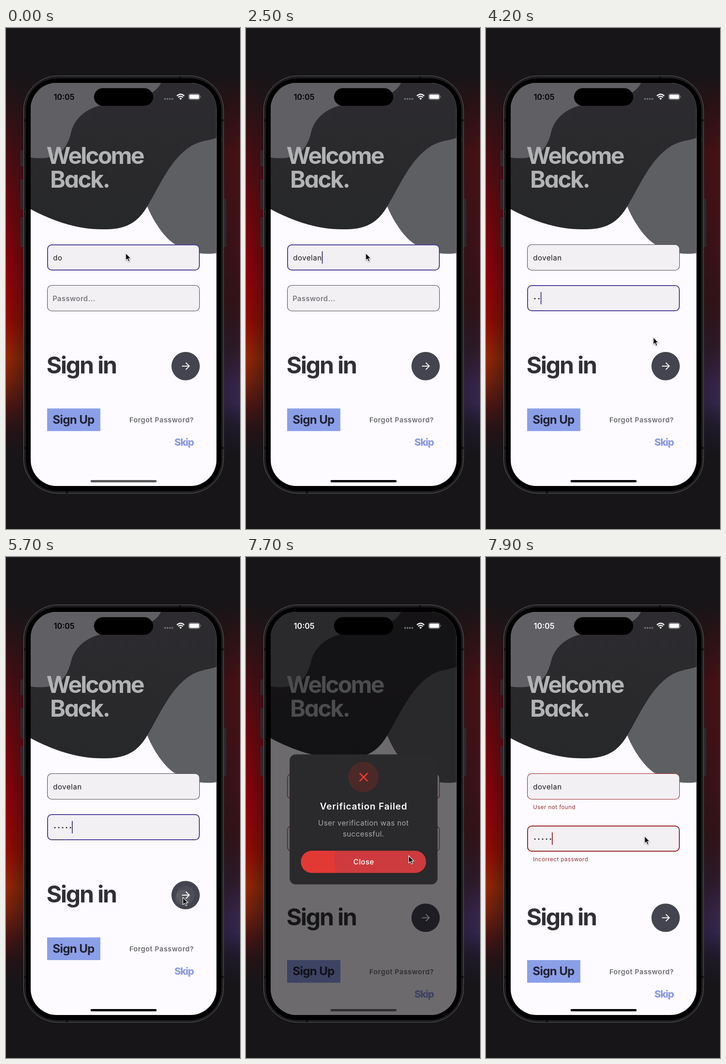
Write an HTML page that moves like this. It is 512x1095 px and loops after 8000 ms.

```html
<!DOCTYPE html>
<html lang="en">
<head>
<meta charset="utf-8">
<title>Sign in</title>
<style>
  html, body { margin: 0; width: 100%; height: 100%; overflow: hidden; background: #171518; }
  svg { display: block; width: 512px; height: 1095px; }
  text { font-family: Inter, "Open Sans", sans-serif; font-optical-sizing: none; white-space: pre; }
  .title { font-size: 51px; font-weight: 700; letter-spacing: -2.3px; font-feature-settings: "cv11"; }
  .body { font-size: 16px; letter-spacing: .4px; }
  .error { font-size: 12px; letter-spacing: .6px; fill: #9b2a2b; }
  .mid { text-anchor: middle; }
</style>
</head>
<body>
<svg viewBox="0 0 512 1095">
  <defs>
    <linearGradient id="leftGlow" gradientUnits="userSpaceOnUse" x1="0" y1="0" x2="0" y2="1000">
      <stop offset=".1" stop-color="#171518"/>
      <stop offset=".18" stop-color="#2c1115"/>
      <stop offset=".27" stop-color="#490c12"/>
      <stop offset=".4" stop-color="#70050c"/>
      <stop offset=".54" stop-color="#920008"/>
      <stop offset=".64" stop-color="#960a00"/>
      <stop offset=".72" stop-color="#982604"/>
      <stop offset=".77" stop-color="#7a210a"/>
      <stop offset=".83" stop-color="#4a1412"/>
      <stop offset=".88" stop-color="#271216"/>
      <stop offset=".93" stop-color="#171518"/>
    </linearGradient>
    <linearGradient id="rightGlow" gradientUnits="userSpaceOnUse" x1="0" y1="0" x2="0" y2="1000">
      <stop offset=".1" stop-color="#171518"/>
      <stop offset=".17" stop-color="#2c1115"/>
      <stop offset=".27" stop-color="#481014"/>
      <stop offset=".42" stop-color="#441117"/>
      <stop offset=".6" stop-color="#341218"/>
      <stop offset=".7" stop-color="#2d1a28"/>
      <stop offset=".78" stop-color="#38244c"/>
      <stop offset=".82" stop-color="#32264f"/>
      <stop offset=".87" stop-color="#201a2c"/>
      <stop offset=".93" stop-color="#171518"/>
    </linearGradient>
    <linearGradient id="falloff">
      <stop offset="0" stop-color="#171518" stop-opacity="0"/>
      <stop offset=".08" stop-color="#171518" stop-opacity=".45"/>
      <stop offset=".93" stop-color="#171518" stop-opacity=".3"/>
      <stop offset="1" stop-color="#171518" stop-opacity="0"/>
    </linearGradient>
    <linearGradient id="wave" x2="0" y2="1">
      <stop offset="0" stop-color="#2d2b2f"/>
      <stop offset="1" stop-color="#27282a"/>
    </linearGradient>
    <clipPath id="screen"><rect x="54" y="120" width="406.5" height="881" rx="57"/></clipPath>
    <clipPath id="arrowClip"><circle cx="393" cy="739" r="31"/></clipPath>
    <clipPath id="closeClip"><rect x="120" y="642" width="274" height="48.5" rx="24"/></clipPath>
  </defs>

  <rect width="512" height="1095" fill="#171518"/>
  <rect width="256" height="1000" fill="url(#leftGlow)"/>
  <rect x="256" width="256" height="1000" fill="url(#rightGlow)"/>
  <rect width="512" height="1095" fill="url(#falloff)"/>
  <rect width="512" height="1" fill="#29282b"/>

  <g fill="#29292b" stroke="#3a3a3c" stroke-width=".8">
    <rect x="32.5" y="268.5" width="8" height="33" rx="1.5"/>
    <rect x="32.5" y="331.5" width="8" height="64" rx="1.5"/>
    <rect x="32.5" y="414.5" width="8" height="63" rx="1.5"/>
    <rect x="473.5" y="374.5" width="7.5" height="103" rx="1.5"/>
  </g>
  <rect x="38.5" y="104.5" width="437.5" height="912.5" rx="75" fill="#1d1d1f" stroke="#626264"/>
  <path d="M381 105v5M133 1012v5M39 202h5M471 202h5M39 918h5M471 918h5" stroke="#0e0e10" stroke-width="5"/>
  <rect x="43.5" y="110" width="427.5" height="902" rx="69"/>

  <g clip-path="url(#screen)">
    <rect x="54" y="120" width="407" height="882" fill="#fdfbff"/>
    <path fill="#5e5f62" d="M461 220H380L303 382L309 390C325 428 350 462 372 474C400 490 430 497 461 492Z"/>
    <path fill="url(#wave)" d="M54 120H461V240C445 246 425 246 405 258C360 286 338 342 309 390C288 426 262 440 215 440C157 441 103 422 54 396Z"/>
    <path fill="#605f63" d="M54 120H339C329 141 309 146 290 151C262 160 225 162 194 173C166 184 149 203 143 226C134 262 118 292 54 283Z"/>
    <g class="title" fill="#b2b3b5">
      <text x="88.500" y="297" style="letter-spacing:-3px">Welcome</text>
      <text x="96.500" y="348.500" style="letter-spacing:-2.600px">Back.</text>
    </g>

    <rect id="userBox" fill="#f3f0f4"/>
    <text id="userText" x="103" y="508" font-size="16" style="letter-spacing:.5px" fill="#1c1b1f"></text>
    <rect id="userCaret" y="488" width="2" height="27" fill="#4b4091"/>
    <text id="userError" class="error" x="103" y="551">User not found</text>

    <g id="passGroup">
      <rect id="passBox" fill="#f3f0f4"/>
      <text id="hint" x="102" y="597" font-size="15.500" font-weight="600" style="letter-spacing:.5px" fill="#79787c">Password...</text>
      <g id="dots" fill="#1c1b1f"></g>
      <rect id="passCaret" y="577" width="2" height="27"/>
      <text id="passError" class="error" x="103" y="640">Incorrect password</text>
    </g>

    <g id="actions">
      <text class="title" x="88.500" y="755" fill="#303034">Sign in</text>
      <circle cx="393" cy="739" r="31" fill="#43444f"/>
      <g clip-path="url(#arrowClip)" fill="#fff">
        <circle id="arrowGlow" cx="393" cy="739" r="20"/>
        <circle id="arrowRipple"/>
      </g>
      <path d="M385 739H400.500M393.500 731.500L401 739L393.500 746.500" fill="none" stroke="#fff" stroke-width="2"/>
      <rect x="90" y="831.500" width="116.500" height="49.500" fill="#8b9fe8"/>
      <text x="102" y="864.500" font-size="25.500" font-weight="700" style="letter-spacing:-.7px" fill="#20212f">Sign Up</text>
      <text x="270" y="862" font-size="15" font-weight="600" style="letter-spacing:.7px" fill="#69686c">Forgot Password?</text>
      <text x="368.500" y="913" font-size="21.500" font-weight="800" style="letter-spacing:-1.200px" fill="#8b9bdf">Skip</text>
    </g>
    <rect id="dim" x="54" y="120" width="407" height="882" fill="#050305"/>
  </g>

  <rect x="192.500" y="131.500" width="129.500" height="38.500" rx="19.250"/>
  <text id="clock" x="104.500" y="156.500" font-size="17" font-weight="600">10:05</text>
  <g fill="#707073">
    <circle cx="348" cy="155" r="2"/><circle cx="353.300" cy="155" r="2"/>
    <circle cx="358.600" cy="155" r="2"/><circle cx="363.900" cy="155" r="2"/>
  </g>
  <g fill="none" stroke="#fff" stroke-width="2.400">
    <path d="M374 148.500Q382 141 390 148.500M376.800 151.700Q382 147 387.200 151.700"/>
    <path d="M379.500 154Q382 152 384.500 154L382 156.700Z" fill="#fff" stroke-width=".5"/>
  </g>
  <rect x="399.500" y="144" width="24.500" height="12.500" rx="3.800" fill="none" stroke="#a5a5a7"/>
  <rect x="401" y="145.500" width="21.500" height="9.500" rx="2.500" fill="#fff"/>
  <path d="M425.500 148.300Q427.500 150.200 425.500 152.200Z" fill="#a5a5a7"/>
  <rect id="homeBar" x="185" y="988" width="144.500" height="5" rx="2.500"/>

  <g id="dialog">
    <rect x="95.500" y="431.500" width="323.500" height="284" rx="13" fill="#2a292b"/>
    <circle cx="257" cy="481" r="33.300" fill="#4b2928"/>
    <path d="M248.500 472.500L266 490M266 472.500L248.500 490" stroke="#f23b32" stroke-width="2.700"/>
    <text class="mid" x="257.500" y="552" font-size="20" font-weight="600" style="letter-spacing:.9px" fill="#fff">Verification Failed</text>
    <g class="body mid" fill="#aaa9ac">
      <text x="257" y="586.500">User verification was not</text>
      <text x="257" y="610.500">successful.</text>
    </g>
    <rect x="120" y="642" width="274" height="48.500" rx="24" fill="#f2382f"/>
    <g clip-path="url(#closeClip)" fill="#5a4468">
      <rect id="closeGlow" x="120" y="642" width="274" height="49"/>
      <circle id="closeRipple"/>
    </g>
    <text class="body mid" x="257.500" y="672" font-weight="500" fill="#fff">Close</text>
  </g>

  <path id="pointer" d="M0 0V16L3.600 12.700L6.100 18.500L8.900 17.300L6.400 11.700H11.300Z"
    stroke="#fff" stroke-width="1.200" style="filter:drop-shadow(0 1px 1px #0006)"/>
</svg>
<script>
const LOOP = 8000;
const USER = "dovelan";
const USER_KEYS = [-900, -600, 300, 550, 800, 1050, 1300];
const PASS_KEYS = [3700, 4000, 4250, 4450, 4650];
const FOCUS_PASS = 3150, SUBMIT = 5600, FAIL = 5900, CLOSE = 7600, DISMISS = 7740;
// time, x, y of the pointer tip
const PATH = [
  [0, 262, 492], [2800, 262, 492], [3100, 296, 588], [3250, 300, 592],
  [3650, 366, 676], [4900, 366, 676], [5450, 387, 744], [5850, 387, 744],
  [6250, 359, 646], [7000, 359, 646], [7300, 356, 653], [7720, 356, 653],
  [7900, 347, 610], [8000, 347, 610]
];

const el = {};
document.querySelectorAll("svg [id]").forEach(node => el[node.id] = node);
const set = (node, attrs) => {
  for (const name in attrs) node.setAttribute(name, attrs[name]);
};
const show = (node, on) => set(node, { opacity: +on });
const progress = (t, start, length) => Math.min(1, Math.max(0, (t - start) / length));
const ease = p => p * p * (3 - 2 * p);
const mix = (a, b, p) => a + (b - a) * p;
const typed = (keys, t) => keys.filter(key => key <= t).length;
const blink = (since, t) => (t - since) % 1000 < 500;

PASS_KEYS.forEach((_, i) => {
  const dot = document.createElementNS("http://www.w3.org/2000/svg", "circle");
  set(dot, { cx: 107 + i * 8.5, cy: 591.5, r: 1.5 });
  el.dots.append(dot);
});

function pointerAt(t) {
  const i = PATH.findIndex((point, k) => k && point[0] >= t);
  const [t0, x0, y0] = PATH[i - 1], [t1, x1, y1] = PATH[i];
  const p = ease(progress(t, t0, t1 - t0));
  return [mix(x0, x1, p), mix(y0, y1, p)];
}

function ripple(circle, glow, t, start, x, y, radius, strength) {
  const p = progress(t, start, 250);
  const fade = 1 - progress(t, start + 250, 200);
  const alpha = t >= start ? strength * fade : 0;
  set(circle, { cx: x, cy: y, r: mix(radius * .2, radius, p), opacity: alpha });
  show(glow, alpha * .6);
}

// The border lies wholly inside the 334 x 57 box.
function drawBox(box, top, focused, failed) {
  const line = focused ? 2 : 1.1;
  set(box, {
    x: 90 + line / 2, y: top + line / 2,
    width: 334 - line, height: 57 - line, rx: 10 - line / 2,
    stroke: failed ? "#962325" : focused ? "#4b4091" : "#49474d",
    "stroke-width": line
  });
}

function drawFields(t, failed, modal) {
  const onPass = t >= FOCUS_PASS;
  const userCount = typed(USER_KEYS, t), passCount = typed(PASS_KEYS, t);
  el.userText.textContent = USER.slice(0, userCount);
  set(el.userCaret, { x: 103 + el.userText.getComputedTextLength() });
  show(el.userCaret, !onPass && blink(USER_KEYS[userCount - 1], t));

  const lastKey = passCount ? PASS_KEYS[passCount - 1] : FOCUS_PASS;
  show(el.hint, !passCount);
  [...el.dots.children].forEach((dot, i) => show(dot, i < passCount));
  set(el.passCaret, { x: 103 + passCount * 8.2, fill: failed ? "#9b2a2b" : "#4b4091" });
  show(el.passCaret, onPass && !modal && blink(lastKey, t));

  drawBox(el.userBox, 473, !onPass, failed);
  drawBox(el.passBox, 562, onPass && !modal, failed);
  show(el.userError, failed);
  show(el.passError, failed);
  set(el.passGroup, { transform: `translate(0 ${failed ? 25 : 0})` });
  set(el.actions, { transform: `translate(0 ${failed ? 49.5 : 0})` });
}

function draw(t) {
  const failed = t >= FAIL;
  const modal = failed && t < DISMISS;
  const cover = ease(progress(t, FAIL, 200)) * (1 - ease(progress(t, DISMISS, 150)));
  drawFields(t, failed, modal);
  show(el.dim, cover * .58);
  show(el.dialog, cover);
  set(el.clock, { fill: failed ? "#fff" : "#000" });

  const bar = Math.round(Math.max(88 * (1 - progress(t, 0, 500)), 46 * cover));
  set(el.homeBar, { fill: `rgb(${bar},${bar},${bar})` });

  ripple(el.arrowRipple, el.arrowGlow, t, SUBMIT, 387, 744, 32, .08);
  ripple(el.closeRipple, el.closeGlow, t, CLOSE, 356, 661, 311, .16);
  set(el.pointer, { transform: `translate(${pointerAt(t)})` });
}

function tick() {
  draw(performance.now() % LOOP);
  requestAnimationFrame(tick);
}
tick();
</script>
</body>
</html>
```
